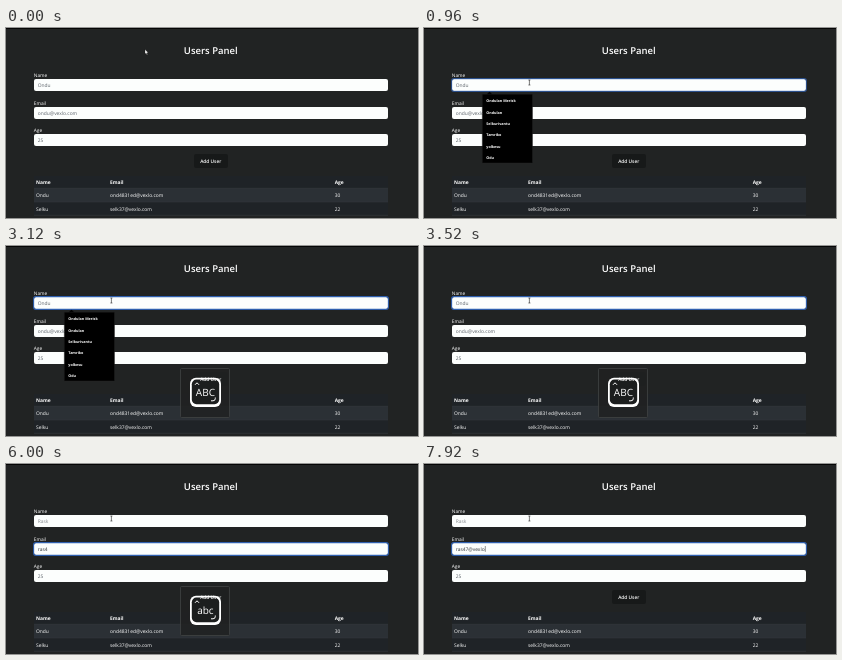
Write an HTML page that moves like this. It is 412x190 px and loops after 8000 ms.

```html
<!DOCTYPE html>
<html lang="en">
<head>
<meta charset="utf-8">
<title>Users Panel</title>
<style>
  html, body { margin: 0; width: 100%; height: 100%; overflow: hidden; background: #212323; }
  svg { display: block; width: 100vw; height: 100vh; }
  text { font: 500 4.9px "Open Sans", "Noto Sans", sans-serif; fill: #fff; text-rendering: geometricPrecision; }
  .title { font-size: 9.5px; font-weight: 600; text-anchor: middle; }
  .label { font-size: 4.8px; }
  .bold { font-weight: 700; }
  .button { font-size: 4.8px; font-weight: 600; text-anchor: middle; }
  .hint { fill: #5c636a; }
  .typed { fill: #2b3035; }
  .past { fill: #858a8f; }
  .field { fill: #fcfefd; }
  .menu text { font-size: 3.7px; font-weight: 700; }
  .key { font-size: 10px; text-anchor: middle; }
</style>
</head>
<body>
<svg viewBox="0 0 412 190">
  <rect width="412" height="190" fill="#212323"/>
  <rect width="412" height="1" fill="#050505"/>
  <text class="title" x="204.8" y="26.2">Users Panel</text>

  <text class="label" x="27.8" y="49">Name</text>
  <text class="label" x="27.8" y="76.5">Email</text>
  <text class="label" x="27.8" y="103.8">Age</text>
  <rect class="field" x="28" y="51" width="354" height="12" rx="2"/>
  <rect class="field" x="28" y="79" width="354" height="12" rx="2"/>
  <rect class="field" x="28" y="106" width="354" height="12" rx="2"/>
  <rect id="ring" x="27.6" y="50.6" width="354.8" height="12.8" rx="2.3" fill="none" stroke="#2f5fae" stroke-width="1.1"/>
  <text id="name" x="31.8" y="59.3"></text>
  <text id="email" x="31.8" y="86.7"></text>
  <rect id="caret" y="82" width=".5" height="5.8" fill="#222"/>
  <text class="hint" x="31.8" y="113.9">25</text>

  <rect x="188" y="126" width="34" height="14" rx="2" fill="#171919"/>

  <rect x="28" y="148" width="354" height="39.3" fill="#1f2327"/>
  <rect x="28" y="160.4" width="354" height="13.4" fill="#2b3035"/>
  <path d="M28 160.3H382M28 173.9H382M28 187.3H382" stroke="#3a3f44" stroke-width=".5"/>
  <g id="table"></g>

  <g id="menu" class="menu">
    <path d="M62.5 66.5L65.5 63.8L68.5 66.5Z"/>
    <rect x="58.3" y="66.2" width="50.2" height="68.8" rx=".6" stroke="#242424" stroke-width=".4"/>
  </g>

  <g id="overlay">
    <rect x="174.5" y="122.5" width="49" height="49" rx="1" fill="#202222" fill-opacity=".85" stroke="#414343" stroke-width=".8"/>
    <rect x="184" y="131.8" width="31" height="29.2" rx="6" fill="#fff"/>
    <rect x="185.8" y="133.6" width="27.4" height="24.6" rx="4.6" fill="#1c1e1e"/>
    <path d="M189 138.8L191 136.8L193 138.8" fill="none" stroke="#fff"/>
    <path d="M209.3 151.5V152.5Q209.3 154.8 207 154.8H205" fill="none" stroke="#fff"/>
    <text id="key" class="key" x="199.4" y="149.9"></text>
  </g>
  <text class="button" x="204.7" y="135">Add User</text>

  <path id="arrow" d="M0 0V4.6L1.1 3.6L1.9 5.2L2.6 4.9L1.9 3.3H3.3Z" fill="#fff" stroke="#111" stroke-width=".3"/>
  <path id="beam" d="M-1 -2.5H1M0 -2.5V2.5M-1 2.5H1" fill="none" stroke="#222" stroke-width=".6"/>
</svg>
<script>
const LOOP = 8000;
const $ = id => document.getElementById(id);

function addText(parent, x, y, content, cls = "") {
  const node = document.createElementNS("http://www.w3.org/2000/svg", "text");
  node.setAttribute("x", x);
  node.setAttribute("y", y);
  node.setAttribute("class", cls);
  node.textContent = content;
  parent.append(node);
}

[["Name", "Email", "Age"],
 ["Ondu", "ond4831ed@vexlo.com", "30"],
 ["Selku", "selk37@vexlo.com", "22"]].forEach((row, r) =>
  row.forEach((cell, c) =>
    addText($("table"), [30, 104, 328.7][c], [156.1, 169.1, 182.5][r], cell, r ? "" : "bold")));

["Ondulan Merisk", "Ondulan", "Selkurivantu", "Tamriko", "yolkesu", "Odu"].forEach((item, i) =>
  addText($("menu"), 62.3, 74.2 + i * 11.4, item));

// Each step is [start time, value]; the latest one that has begun applies.
const at = (steps, t) => steps.reduce((value, step) => t >= step[0] ? step[1] : value, steps[0][1]);

const pointer = [[0, [139, 21.5]], [80, [136, 25]], [160, [123, 38]], [240, [109, 50]], [320, [105.4, 54.5]]];
const nameText = [[0, ""], [3760, "Ra"], [4320, "Rask"]];
const emailText = [[0, ""], [5040, "r"], [5120, "ra"], [5280, "ras"], [5680, "ras4"], [6320, "ras47"],
  [7040, "ras47@"], [7120, "ras47@v"], [7200, "ras47@ve"], [7440, "ras47@vex"], [7600, "ras47@vexl"], [7920, "ras47@vexlo"]];
const overlayAlpha = [[0, 0], [1760, 1], [7040, .65], [7120, .3], [7200, .06], [7440, 0]];

function setField(node, value, hint, cls) {
  node.textContent = value || hint;
  node.setAttribute("class", value ? cls : "hint");
}

const show = (id, visible) => $(id).setAttribute("visibility", visible ? "visible" : "hidden");

function draw(t) {
  const [x, y] = at(pointer, t);
  for (const id of ["arrow", "beam"]) $(id).setAttribute("transform", `translate(${x} ${y})`);
  show("arrow", t < 320);
  show("beam", t >= 320);

  const focus = t < 960 ? 0 : Math.min(1, .75 + (t - 960) / 640);
  $("ring").setAttribute("opacity", focus);
  $("ring").setAttribute("transform", `translate(0 ${t < 4560 ? 0 : 28})`);

  setField($("name"), at(nameText, t), "Ondu", t < 4560 ? "typed" : "past");
  const email = at(emailText, t);
  setField($("email"), email, "ondu@vexlo.com", "typed");
  show("caret", t >= 7920);
  if (t >= 7920) $("caret").setAttribute("x", 32.1 + $("email").getComputedTextLength());

  show("menu", t >= 960 && t < 3520);
  $("overlay").setAttribute("opacity", at(overlayAlpha, t));
  $("key").textContent = t < 3760 ? "ABC" : "abc";
}

const start = performance.now();
function tick(now) {
  draw(Math.max(0, now - start) % LOOP);
  requestAnimationFrame(tick);
}
draw(0);
requestAnimationFrame(tick);
</script>
</body>
</html>
```
